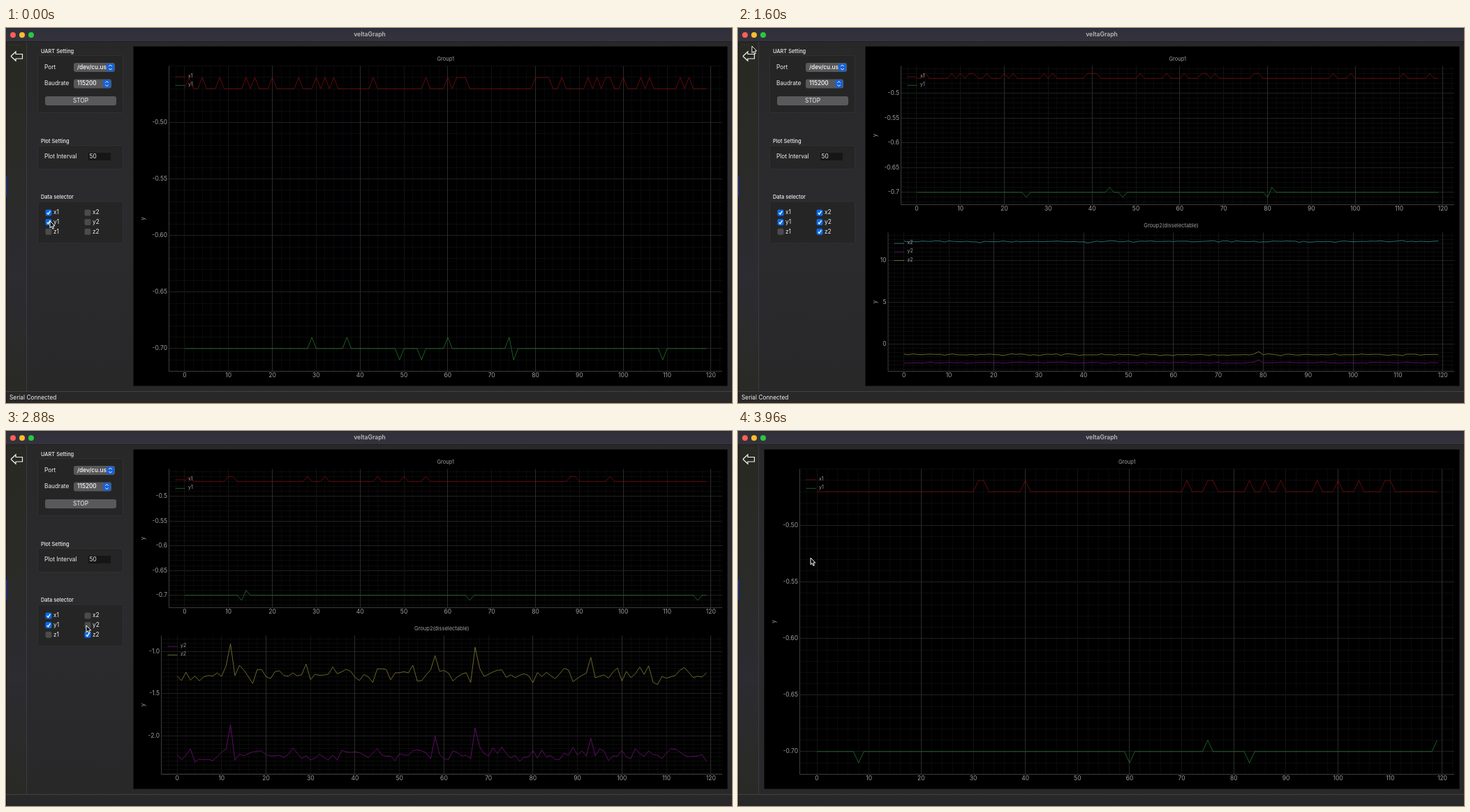
An HTML page with a canvas for the animation above (4 s loop, 1040 by 538 pixels).

```html
<!DOCTYPE html>
<html lang="en">
<head>
<meta charset="utf-8">
<title>Serial plotter</title>
<style>
html, body { margin: 0; width: 100%; height: 100%; overflow: hidden; background: #28282a; }
canvas { display: block; }
</style>
</head>
<body>
<canvas id="stage" width="1040" height="538"></canvas>
<script>
const g = document.getElementById('stage').getContext('2d');
const LOOP = 4000, STEP = 40, COUNT = 120;
const LABEL = '#a0a0a0', INK = '#f0f0f0';

// Pointer moves: start, end, then where it comes to rest
const pointerHome = [63, 277];
const pointerMoves = [
  [160, 320, 117, 263], [480, 560, 117, 276], [680, 800, 117, 290], [1000, 1600, 20, 26],
  [1600, 1680, 16, 42], [2400, 2640, 115, 263], [2760, 2840, 115, 279], [2960, 3040, 115, 291],
  [3120, 3360, 14, 39], [3640, 3900, 104, 182]
];
const checkedTimes = { x1: [0, LOOP], y1: [0, LOOP], x2: [400, 2720], y2: [640, 2840], z2: [860, 3100] };

// Seeded random number from 0 to 1 for sample i
function random(i, seed) {
  let h = Math.imul(i + 1, 0x9e3779b1) ^ Math.imul(seed, 0x85ebca6b);
  h = Math.imul(h ^ h >>> 15, 0x2c1b3c6d);
  h = Math.imul(h ^ h >>> 13, 0x297a2d39);
  return ((h ^ h >>> 16) >>> 0) / 2 ** 32;
}
const jitter = (i, seed, size) => (random(i, seed) + random(i, seed + 10) - 1) * size;

// Sudden movements of the sensor; jolts reach both y2 and z2
const swings = { 30: -0.22, 45: 0.17, 58: -0.23, 101: -0.15, 125: -0.18 };
const jolts = { 163: 0.36, 209: 0.22, 218: 0.32, 244: 0.2 };

const series = {
  x1: { color: '#7d0d0d', range: [-0.47, -0.46], at: i => random(i, 1) < 0.19 ? -0.46 : -0.47 },
  y1: {
    color: '#21752c', range: [-0.71, -0.69],
    at: i => -0.7 + (random(i, 2) < 0.04 ? -0.01 : random(i, 2) > 0.985 ? 0.01 : 0)
  },
  x2: { color: '#358c89', range: [12.07, 12.47], at: i => 12.3 + (swings[i] || jitter(i, 3, 0.13)) },
  y2: { color: '#75117c', range: [-2.37, -1.85], at: i => -2.23 + (jolts[i] || jitter(i, 4, 0.11)) },
  z2: { color: '#858137', range: [-1.45, -0.9], at: i => -1.27 + (jolts[i] || jitter(i, 5, 0.14)) }
};

// The stream starts a little slower, then runs at an even rate
const samplesSeen = t => Math.round(t < 600 ? t * 0.0483 : 29 + (t - 600) * 0.0546 - Math.max(0, t - 1600) * 0.0021);

function pointerAt(t) {
  let [x, y] = pointerHome;
  for (const [start, end, toX, toY] of pointerMoves) {
    const f = Math.min(1, Math.max(0, (t - start) / (end - start)));
    x += (toX - x) * f;
    y += (toY - y) * f;
  }
  return [x, y];
}

function text(s, x, y, size = 8.3, color = INK, align = 'left', weight = 400) {
  g.font = `${weight} ${size}px Inter, sans-serif`;
  g.textAlign = align;
  g.textBaseline = 'middle';
  g.fillStyle = color;
  g.fillText(s, x, y);
}

function box(x, y, w, h, fill, r = 0, border) {
  g.beginPath();
  g.roundRect(x, y, w, h, r);
  g.fillStyle = fill;
  g.fill();
  if (border) { g.lineWidth = 1; g.strokeStyle = border; g.stroke(); }
}

function line(points, color, width = 1) {
  g.beginPath();
  points.forEach(([x, y]) => g.lineTo(x, y));
  g.strokeStyle = color;
  g.lineWidth = width;
  g.stroke();
}

function shade(x, y, w, h, colors) {
  const fill = g.createLinearGradient(0, y, 0, y + h);
  colors.forEach((c, i) => fill.addColorStop(i / (colors.length - 1), c));
  box(x, y, w, h, fill);
}

// Maps a data range to pixels, with a margin that shrinks on larger plots
function scale(lo, hi, from, to) {
  const size = Math.abs(to - from), pad = (hi - lo) * 0.845 / Math.sqrt(size);
  const min = lo - pad, max = hi + pad;
  const map = v => from + (v - min) / (max - min) * (to - from);
  return { min, max, map };
}

function ticks({ min, max }, step) {
  const out = [];
  for (let n = Math.ceil(min / step); n * step <= max; n++) out.push(n * step);
  return out;
}

function plot(title, names, first, x0, top, bottom, axis) {
  const left = x0 + axis.width, right = 1026, middle = (top + bottom) / 2;
  const ranges = names.flatMap(n => series[n].range);
  const xs = scale(0, COUNT - 1, left, right);
  const ys = scale(Math.min(...ranges), Math.max(...ranges), bottom, top);
  const snap = v => Math.round(v - 0.5) + 0.5;
  const vertical = (v, c) => line([[snap(xs.map(v)), top], [snap(xs.map(v)), bottom]], c);
  const horizontal = (v, c) => line([[left, snap(ys.map(v))], [right, snap(ys.map(v))]], c);

  ticks(xs, 2).forEach(v => vertical(v, '#09090f'));
  ticks(ys, axis.step / axis.minor).forEach(v => horizontal(v, '#0c0c0b'));
  for (const v of ticks(ys, axis.step)) {
    const y = ys.map(v);
    if (y < top + 5 || y > bottom - 5) continue;
    horizontal(v, '#212121');
    text(axis.digits ? v.toFixed(axis.digits) : +v.toFixed(2), left - 2.5, y, 8.5, LABEL, 'right');
  }
  ticks(xs, 10).forEach(v => {
    vertical(v, v % 20 || !v ? '#131316' : '#2b2b2b');
    text(v, xs.map(v), bottom + 6, 8.5, LABEL, 'center');
  });
  line([[left, top], [left, bottom], [right, bottom]], '#3c3c3c');

  text(title, (left + right) / 2, top - 9.5, 7.5, LABEL, 'center');
  g.save();
  g.translate(x0 + 14, middle);
  g.rotate(-Math.PI / 2);
  text('y', 0, 0, 8, LABEL, 'center');
  g.restore();

  names.forEach((n, k) => {
    const { color, at } = series[n];
    line(Array.from({ length: COUNT }, (_, i) => [xs.map(i), ys.map(at(first + i))]), color, 0.8);
    const y = top + 15.5 + k * 12.3;
    line([[left + 9, y], [left + 23, y]], color, 0.8);
    text(n, left + 27.5, y - 1, 7, LABEL);
  });
}

function group(title, y, h) {
  text(title, 50, y - 5.5, 7.4, INK, 'left', 500);
  box(45.5, y + 0.5, 122, h, '#252526', 2, '#313132');
}

function combo(label, value, y, w) {
  text(label, 55, y);
  box(97, y - 6.5, w, 13, '#58585a', 3);
  text(value, 102, y, 8.3, '#fff', 'left', 500);
  const x = 97 + w - 12;
  box(x, y - 5.5, 11, 11, '#1762d6', 2.5);
  for (const d of [-1, 1])
    line([[x + 3.3, y + d * 1.4], [x + 5.5, y + d * 3.6], [x + 7.7, y + d * 1.4]], '#fff');
}

function checkbox(name, x, y, on) {
  box(x - 4.5, y - 4.5, 9, 9, on ? '#0b6be6' : '#4b4b4d', 2);
  if (on) line([[x - 2.2, y + 0.2], [x - 0.6, y + 2.2], [x + 2.4, y - 2.4]], '#fff', 1.3);
  text(name, x + 7, y);
}

function settings(isOn) {
  group('UART Setting', 39, 82);
  combo('Port', '/dev/cu.us', 56.5, 59);
  combo('Baudrate', '115200', 80, 54);
  box(56, 98, 102, 13, '#59595b', 3);
  text('STOP', 107, 104.5, 8.3, INK, 'center');
  group('Plot Setting', 168, 34);
  text('Plot Interval', 55, 184.5);
  box(118, 179, 32, 11, '#161617');
  text('50', 119.5, 184.5);
  group('Data selector', 248.5, 60);
  ['x', 'y', 'z'].forEach((c, row) => [1, 2].forEach(n =>
    checkbox(c + n, n === 1 ? 61 : 117, 265 + row * 13.6, isOn(c + n))));
}

function chrome(status) {
  shade(0, 0, 1040, 538, ['#282829', '#2b2b2e', '#282829']);
  shade(1, 20, 28, 501, ['#292923', '#2a2a27', '#2c2c31', '#292925']);
  shade(0, 0, 1040, 19, ['#303039', '#34333d']);
  box(0, 0, 1040, 1, '#1b2740');
  box(0, 19, 1040, 1, '#202022');
  box(29, 20, 1, 501, '#3b3b42');
  box(0, 20, 1, 518, '#17171f');
  box(0, 213, 1.5, 29, '#1b2b93');
  box(0, 521, 1040, 1, '#414143');
  ['#ff5f57', '#febc2e', '#28c840'].forEach((c, i) => box(6 + i * 13, 6, 8, 8, c, 4));
  text('veltaGraph', 521, 9.5, 8.6, '#b9b9bd', 'center', 600);
  for (let x = 6; x < 23; x += 3) box(x, 24, 1, 1, '#42423a');
  line([[7, 40.5], [14, 34], [14, 37.5], [23.5, 37.5], [23.5, 44], [14, 44], [14, 47], [7, 40.5]], INK, 1.2);
  text(status, 5, 530.5, 8.3);
}

function pointer(x, y) {
  g.beginPath();
  [[0, 0], [0, 9.6], [2.2, 7.6], [3.8, 11.2], [5.4, 10.5], [3.9, 7], [6.8, 7]]
    .forEach(([dx, dy]) => g.lineTo(x + dx, y + dy));
  g.closePath();
  g.fillStyle = '#000';
  g.fill();
  g.strokeStyle = '#fff';
  g.lineWidth = 1;
  g.stroke();
}

function lowerAxis(names) {
  if (names.length === 1 && names[0] === 'x2') return { step: 0.05, minor: 5, width: 45.5 };
  if (names.includes('x2')) return { step: 5, minor: 10, width: 32 };
  return { step: names.includes('y2') ? 0.5 : 0.2, minor: 10, width: 39.5, digits: 1 };
}

function draw(t) {
  const within = (a, b) => t >= a && t < b;
  const hidden = within(1840, 2300) || t >= 3440;
  const hovering = within(1640, 2440) || within(3300, 3700);
  const first = samplesSeen(t);
  const isOn = n => n in checkedTimes && within(...checkedTimes[n]);

  chrome(hovering ? 'Show/Hide Setting' : t < 1640 ? 'Serial Connected' : '');
  if (!hidden) settings(isOn);

  const x0 = hidden ? 38 : 183;
  box(x0 - 0.5, 26.5, 1034 - x0, 487, '#000');
  // The plots react a moment after a checkbox changes
  const lower = ['x2', 'y2', 'z2'].filter(n => within(checkedTimes[n][0] + 60, checkedTimes[n][1] + 60));
  const split = lower.length > 0;
  plot('Group1', ['x1', 'y1'], first, x0, 54.5, split ? 253.5 : 492.5,
    { step: 0.05, minor: 5, width: 50.5, digits: split ? 0 : 2 });
  if (split) plot('Group2(disselectable)', lower, first, x0, 293.5, 492.5, lowerAxis(lower));

  pointer(...pointerAt(t));
}

function tick() {
  const t = performance.now() % LOOP;
  draw(Math.floor(t / STEP) * STEP);
  requestAnimationFrame(tick);
}
tick();
</script>
</body>
</html>
```
